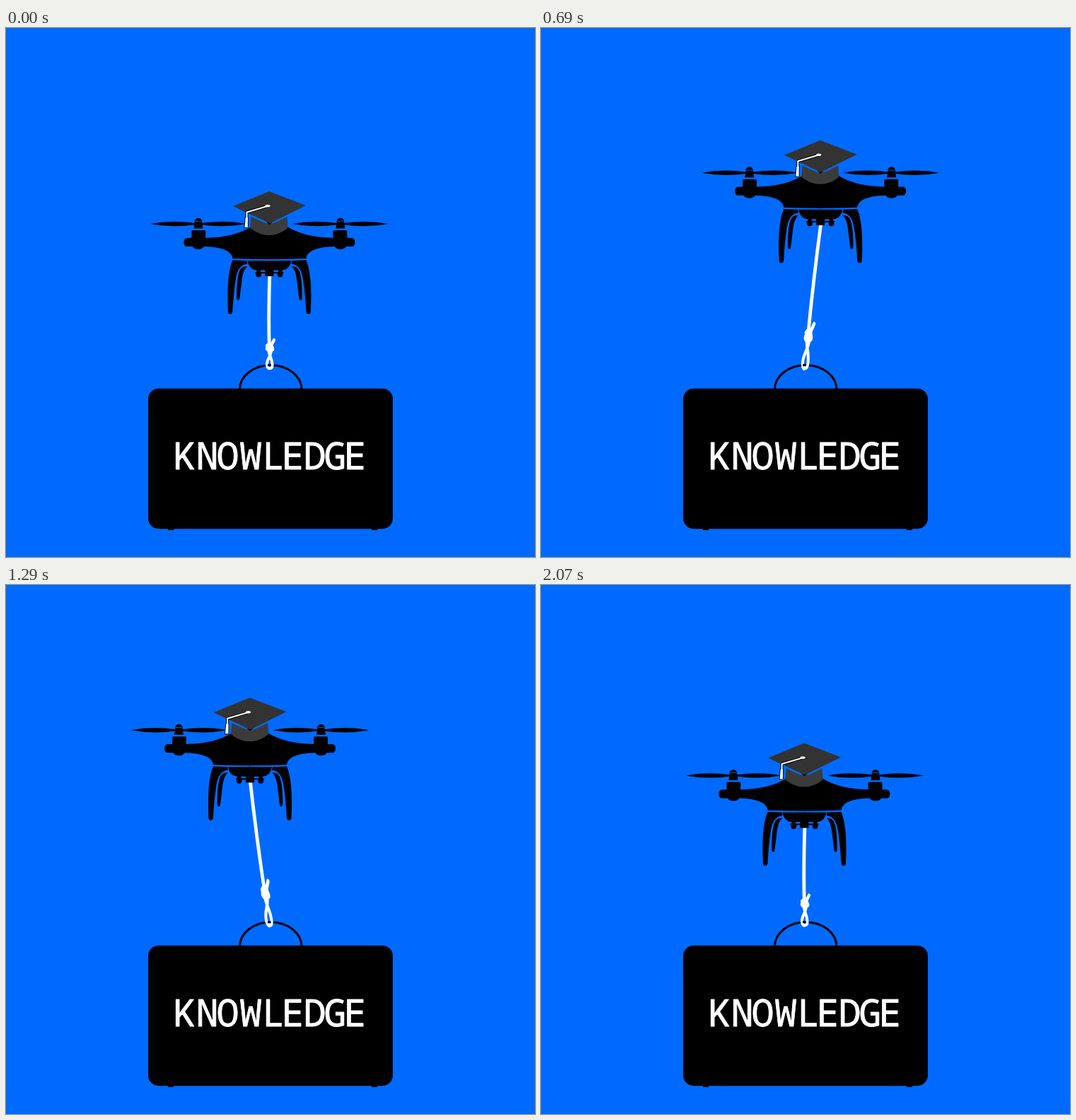
An HTML page with a canvas that plays this animation: 748x748 px, repeating every 2100 ms.

```html
<!DOCTYPE html>
<html lang="en">
<head>
<meta charset="utf-8">
<title>Knowledge drone</title>
<style>
html, body { margin: 0; width: 100%; height: 100%; overflow: hidden; background: #006aff; }
canvas { display: block; }
</style>
</head>
<body>
<canvas id="stage" width="748" height="748"></canvas>
<script>
const ctx = document.getElementById('stage').getContext('2d');
const BLUE = '#006aff', BLACK = '#000', WHITE = '#fff';
const LOOP = 2100, STEP = 30;

// time, dx, dy of the drone; linear in between
const KEYS = [
  [0, 0, 0], [300, 0.7, -75.4], [750, 26.2, -71.7],
  [1265, -28.8, -71.5], [1800, 0.7, -75.4], [2100, 0, 0]
];

// Each letter is centred on its own x
const WORD = 'KNOWLEDGE';
const CENTRES = [253, 284.5, 313.5, 346, 379, 406, 437, 465, 494];

// One half of the drone, x measured from its axis
const AXIS = 372.4;
const HALF = [
  // body and arm
  'M1 280H-24C-40 290.5-62 296.5-91 296.7H-116Q-121 297-121 303Q-121 309-116 309H-91C-66 309.5-53 316-52 326Q-26 327 1 327Z',
  // motor
  'M-109 286H-92Q-90 286-90 289L-91 306Q-93 313-100.4 313Q-108 313-110 306V289Q-110 286-109 286Z',
  'M-107 283.5L-105.5 272Q-104 268.5-100.4 268.5Q-97 268.5-95.5 272L-94 283.5Z',
  // propeller
  'M-168.4 277Q-138 271-106 275.8H-95Q-62 271-32.4 277Q-62 282.6-95 278.2H-106Q-138 282.6-168.4 277Z',
  // front and rear legs
  'M-52 328.3L-32 329L-31 333.5C-42 335-46 343-48 358Q-50.5 374-52 401Q-52.5 404.5-55.5 404.5Q-58.3 404.5-58.5 401Q-61 349-52 328.3Z',
  'M-31 337C-35 340-38 347-39 358L-42 382Q-42.2 385-44.3 385Q-46 385-46.2 382Q-46.5 352-41.5 342Q-38.5 336.5-31 337Z',
  // belly, camera and stubs
  'M1 329H-31Q-29 341-19 342.5H1Z',
  'M1 341H-6V351H1Z',
  'M1 345H-20V347H1Z',
  'M-18 341H-12.5V346.5H-11.5V350Q-12 352.5-15.3 352.5Q-18.5 352.5-19 350V346.5H-18Z'
].map(d => new Path2D(d));

const ROPE = new Path2D('M373 344Q372 372 371.8 400T372.3 448');
const KNOT = new Path2D('M372 455L379 441M369 449Q372 445 375 449T377 455Q372 458 369 454Q368 450 376 450');
const NOOSE = new Path2D('M375 455C375 464 368.5 468 369 476Q369 480 372 481.5M371.5 455C371.5 463 376.5 467 376.5 476Q377 481.5 373 481');
const HANDLE = new Path2D('M330.5 511A43.7 34.3 0 0 1 418 511');
const CAP_BASE = new Path2D('M346.5 266.7L364 274.8Q372.5 278.5 381 274.8L397.5 266.7L398.5 283Q386 293 372 293Q358 293 345.5 283Z');
const CAP_TOP = new Path2D('M321 252L372 231L424 251L373 276.3Z');
const CORD = new Path2D('M371 251.5L340.5 260.5V269');
const TASSEL = new Path2D('M338.7 268H342L341.8 282H337.5Z');

function fill(path, color) {
  ctx.fillStyle = color;
  ctx.fill(path);
}

function line(path, color, width) {
  ctx.strokeStyle = color;
  ctx.lineWidth = width;
  ctx.stroke(path);
}

function offsetAt(t) {
  const i = KEYS.findIndex(k => k[0] > t);
  const a = KEYS[i - 1], b = KEYS[i];
  const p = (t - a[0]) / (b[0] - a[0]);
  return [a[1] + (b[1] - a[1]) * p, a[2] + (b[2] - a[2]) * p];
}

function drawWord() {
  ctx.font = '400 53.5px "Noto Sans Mono", "DejaVu Sans Mono", monospace';
  ctx.fontStretch = 'semi-condensed';
  ctx.fillStyle = ctx.strokeStyle = WHITE;
  ctx.lineWidth = 0.8;
  [...WORD].forEach((ch, i) => {
    const m = ctx.measureText(ch);
    const x = CENTRES[i] - (m.actualBoundingBoxRight - m.actualBoundingBoxLeft) / 2;
    ctx.fillText(ch, x, 623.6);
    ctx.strokeText(ch, x, 623.6);
  });
}

function drawCase() {
  ctx.fillStyle = BLACK;
  ctx.beginPath();
  ctx.roundRect(201, 509.7, 346, 198.5, 15);
  ctx.fill();
  ctx.fillRect(229, 707, 8, 3);
  ctx.fillRect(517, 707, 8, 3);
  drawWord();
}

// The rope is pinned at the handle and stretched towards the drone
function drawRope(dx, dy) {
  const foot = 482, len = 132, s = 1 - dy / len, k = dx / len;
  ctx.save();
  ctx.transform(1, 0, -k, s, k * foot, foot - foot * s);
  line(ROPE, WHITE, 4.8);
  line(NOOSE, WHITE, 4);
  line(KNOT, WHITE, 4.2);
  ctx.restore();
  ctx.save();
  ctx.beginPath();
  ctx.rect(370, 470, 4.5, 10);
  ctx.clip();
  line(HANDLE, BLACK, 3);
  ctx.restore();
}

function drawCap() {
  fill(CAP_BASE, '#3b3b3b');
  fill(new Path2D('M368 274.5H377L372.5 278Z'), BLACK);
  fill(CAP_TOP, '#333');
  line(CORD, BLACK, 4);
  line(TASSEL, BLACK, 1.8);
  line(CORD, WHITE, 2);
  fill(TASSEL, WHITE);
  ctx.beginPath();
  ctx.ellipse(370, 251.5, 3.6, 1.8, 0, 0, Math.PI * 2);
  ctx.fill();
}

function drawDrone(dx, dy) {
  ctx.save();
  ctx.translate(dx, dy);
  for (const side of [1, -1]) {
    ctx.save();
    ctx.translate(AXIS, 0);
    ctx.scale(side, 1);
    HALF.forEach(p => fill(p, BLACK));
    ctx.fillStyle = BLUE;
    ctx.fillRect(-105, 272.8, 9, 0.8);
    ctx.restore();
  }
  drawCap();
  ctx.restore();
}

function frame(now) {
  const t = Math.floor((now % LOOP) / STEP) * STEP;
  const [dx, dy] = offsetAt(t);
  ctx.lineCap = ctx.lineJoin = 'round';
  ctx.fillStyle = BLUE;
  ctx.fillRect(0, 0, 748, 748);
  line(HANDLE, BLACK, 3);
  drawCase();
  drawRope(dx, dy);
  drawDrone(dx, dy);
}

const start = performance.now();
function tick() {
  frame(performance.now() - start);
  requestAnimationFrame(tick);
}
tick();
</script>
</body>
</html>
```
